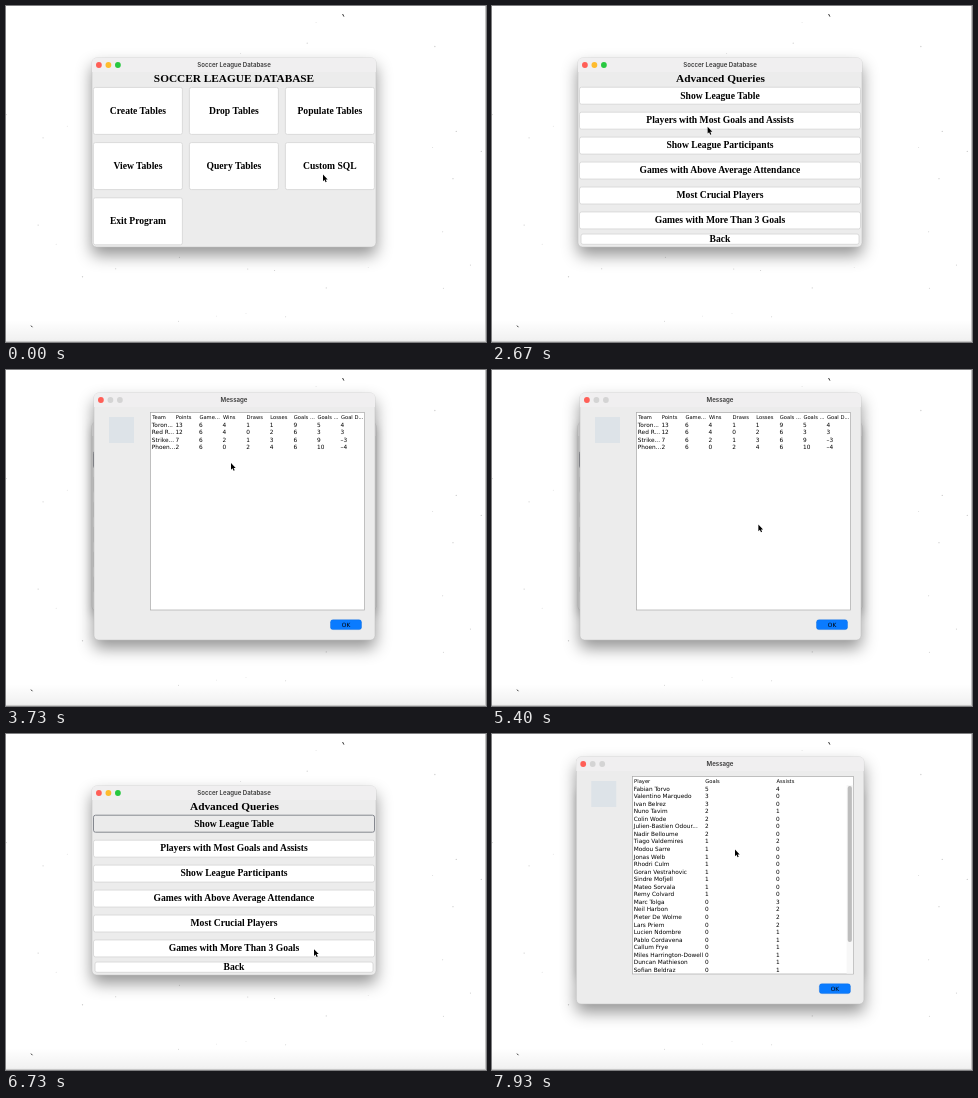
An HTML page for the animation above (8000 ms loop, 480x336 px).

```html
<!DOCTYPE html>
<html lang="en">
<head>
<meta charset="utf-8">
<title>League database demo</title>
<style>
  html, body { margin: 0; width: 100%; height: 100%; overflow: hidden; background: #fff; }
  svg { display: block; width: 480px; height: 336px; }
  text { white-space: pre; font-kerning: none; }
  .title { font: 600 6.1px Inter, "Open Sans", sans-serif; fill: #3a3a3a; }
  .head { font: bold 11.3px "Liberation Serif", Times, serif; }
  .label { font: bold 9.6px "Liberation Serif", Times, serif; }
  .cell { font: 5.8px "DejaVu Sans", sans-serif; }
  .th { font: 5.2px "DejaVu Sans", sans-serif; }
  .mid { text-anchor: middle; }
  .frame { fill: #ececec; stroke: #bdbdbd; stroke-width: .5; filter: drop-shadow(0 8px 8px rgba(0, 0, 0, .42)); }
  .behind .frame { filter: drop-shadow(0 4px 5px rgba(0, 0, 0, .25)); }
  .btn rect { fill: #fff; stroke: #d3d3d3; stroke-width: .8; }
  .btn.down rect { fill: #ebebeb; stroke: #85888f; stroke-width: 1; }
  .ok rect { fill: #0a7bff; stroke: #0869dc; stroke-width: .4; }
  .ok.down rect { fill: #fff; stroke: #555; stroke-width: .8; }
</style>
</head>
<body>
<svg id="stage" viewBox="0 0 480 336"></svg>
<script>
const LOOP = 8000, TICK = 1000 / 15;
const stage = document.getElementById('stage');

function add(parent, tag, attrs = {}, content) {
  const el = document.createElementNS('http://www.w3.org/2000/svg', tag);
  for (const key in attrs) el.setAttribute(key, attrs[key]);
  if (content !== undefined) el.textContent = content;
  parent.append(el);
  return el;
}
const group = (parent, cls = '') => add(parent, 'g', { class: cls });
const rect = (parent, x, y, width, height, rest) => add(parent, 'rect', { x, y, width, height, ...rest });
const text = (parent, x, y, cls, str) => add(parent, 'text', { x, y, class: cls }, str);
const show = (el, on) => el.setAttribute('visibility', on ? 'visible' : 'hidden');

function seeded(seed) {
  return () => (seed = seed * 16807 % 2147483647) / 2147483647;
}

function backdrop() {
  rect(stage, 0, 0, 480, 336, { fill: '#fff' });
  const shade = add(stage, 'linearGradient', { id: 'shade', x2: 0, y2: 1 });
  add(shade, 'stop', { offset: 0, 'stop-opacity': 0 });
  add(shade, 'stop', { offset: 1, 'stop-opacity': .06 });
  rect(stage, 0, 314, 480, 22, { fill: 'url(#shade)' });
  const rand = seeded(71);
  for (let i = 0; i < 40; i++) {
    add(stage, 'circle', { cx: rand() * 476, cy: rand() * 320, r: .4 + rand() * .3, fill: '#ccc' });
  }
  add(stage, 'path', { d: 'M336.6 8l1.3 2.6M25 319.6l1.4 1.6', stroke: '#333', 'stroke-width': 1 });
  add(stage, 'path', { d: 'M479.5 0V336M0 335.4H480', stroke: '#c4c4c4', 'stroke-width': 1 });
}

function makeWindow(x, y, w, h, title, colors) {
  const win = group(stage);
  rect(win, x, y, w, h, { rx: 4.5, class: 'frame' });
  add(win, 'path', { d: `M${x} ${y + 14}v-9.5q0-4.5 4.5-4.5h${w - 9}q4.5 0 4.5 4.5v9.5z`, fill: '#f0eff0' });
  colors.forEach((fill, i) =>
    add(win, 'circle', { cx: x + 6.9 + i * 9.5, cy: y + 7, r: 2.9, fill }));
  text(win, 228, y + 9.2, 'title mid', title);
  return win;
}

function button(parent, x, y, w, h, label) {
  const b = group(parent, 'btn');
  rect(b, x, y, w, h, { rx: 2 });
  text(b, x + w / 2, y + h / 2 + 2.8, 'label mid', label);
  return b;
}

function dialog(x, w, tableX, step, header, rows) {
  const win = makeWindow(x, 23, w, 247, 'Message', ['#ff5f57', '#d4d4d4', '#d4d4d4']);
  const colX = i => tableX + 1.7 + i * step;
  rect(win, x + 15, 47, 25, 26, { fill: '#dde3e8' });
  rect(win, tableX, 42.5, x + w - 10.4 - tableX, 197.5, { fill: '#fff', stroke: '#a9a9a9', 'stroke-width': .7 });
  header.forEach((str, i) => text(win, colX(i), 48.7, 'th', str));
  rows.forEach((row, r) =>
    row.forEach((str, i) => text(win, colX(i) - .4, 56.6 + r * 7.55, 'cell', str)));
  const ok = group(win, 'ok');
  rect(ok, x + w - 44.5, 249.8, 31, 9.8, { rx: 2.4 });
  text(ok, x + w - 29, 256.8, 'cell mid', 'OK');
  return { win, ok };
}

backdrop();

const main = makeWindow(86, 52, 284, 189, 'Soccer League Database', ['#ff5f57', '#febc2e', '#28c840']);
const home = group(main);
text(home, 228, 76, 'head mid', 'SOCCER LEAGUE DATABASE');
const homeButtons = ['Create Tables', 'Drop Tables', 'Populate Tables', 'View Tables',
  'Query Tables', 'Custom SQL', 'Exit Program'].map((label, i) =>
  button(home, 87.4 + i % 3 * 96, 81.4 + Math.floor(i / 3) * 55.2, 89, 47, label));

const queries = group(main);
text(queries, 228.4, 76, 'head mid', 'Advanced Queries');
const queryButtons = ['Show League Table', 'Players with Most Goals and Assists', 'Show League Participants',
  'Games with Above Average Attendance', 'Most Crucial Players', 'Games with More Than 3 Goals'].map((label, i) =>
  button(queries, 87.5, 81.2 + i * 24.95, 281, 17, label));
button(queries, 89, 228, 278, 10.3, 'Back');

const standings = dialog(88, 281, 144.5, 23.6,
  ['Team', 'Points', 'Game...', 'Wins', 'Draws', 'Losses', 'Goals ...', 'Goals ...', 'Goal D...'],
  ['Toron...|13|6|4|1|1|9|5|4', 'Red R...|12|6|4|0|2|6|3|3',
    'Strike...|7|6|2|1|3|6|9|–3', 'Phoen...|2|6|0|2|4|6|10|–4'].map(s => s.split('|')));

// Names grouped by goals; a trailing number is the assists
const byGoals = {
  5: 'Fabian Torvo 4',
  3: 'Valentino Marquedo, Ivan Belrez',
  2: 'Nuno Tavim 1, Colin Wode, Julien-Bastien Odour..., Nadir Belloume',
  1: 'Tiago Valdemires 2, Modou Sarre, Jonas Welb, Rhodri Culm, Goran Vestrahovic, ' +
    'Sindre Mofjell, Mateo Sorvala, Remy Colvard',
  0: 'Marc Tolga 3, Neil Harbon 2, Pieter De Wolme 2, Lars Priem 2, Lucien Ndombre 1, ' +
    'Pablo Cordavena 1, Callum Frye 1, Miles Harrington-Dowell 1, Duncan Mathieson 1, Sofian Beldraz 1'
};
const players = Object.keys(byGoals).reverse().flatMap(goals =>
  byGoals[goals].split(', ').map(entry => {
    const [, name, assists = '0'] = entry.match(/^(.+?)(?: (\d))?$/);
    return [name, goals, assists];
  }));
const scorers = dialog(84.3, 287.6, 140.4, 71.2, ['Player', 'Goals', 'Assists'], players);
rect(scorers.win, 354.6, 51, 6.5, 188.6, { fill: '#f7f7f7' });
rect(scorers.win, 355.7, 52, 4.2, 156, { rx: 2.1, fill: '#bdbdbd' });

const cursor = add(stage, 'path', {
  d: 'M0 0V6.7L1.5 5.3 2.6 7.8 3.7 7.3 2.6 4.9H4.7Z',
  fill: '#000', stroke: '#fff', 'stroke-width': .5, 'paint-order': 'stroke'
});

// Pointer moves: Bézier points, eased out with the given power
const onSql = [317, 168.5], onQuery = [229, 166], onLeague = [225, 93], onOk = [332, 252], onPlayers = [243, 115.5];
const moves = [
  { start: 267, end: 1200, power: 1.8, points: [onSql, [285, 206], onQuery] },
  { start: 2133, end: 3233, power: 2.4, points: [onQuery, [118, 365], [228, 94], onLeague] },
  { start: 5067, end: 6467, power: 1.8, points: [onLeague, onOk] },
  { start: 6600, end: 7433, power: 1.8, points: [onOk, onPlayers] }
];

function bezier(points, u) {
  if (points.length === 1) return points[0];
  const next = points.slice(1).map(([x, y], i) =>
    [points[i][0] + (x - points[i][0]) * u, points[i][1] + (y - points[i][1]) * u]);
  return bezier(next, u);
}

function pointerAt(t) {
  const move = moves.filter(m => t >= m.start).pop() || moves[0];
  const s = Math.min(1, Math.max(0, (t - move.start) / (move.end - move.start)));
  return bezier(move.points, 1 - (1 - s) ** move.power);
}

function draw(now) {
  const t = Math.floor((now % LOOP + 4) / TICK) * TICK % LOOP;
  const within = (from, to) => t >= from - 4 && t < to - 4;
  const press = (el, on) => el.classList.toggle('down', on);
  const first = within(3733, 6600), second = within(7933, LOOP + 4);

  show(home, within(0, 1800));
  show(queries, !within(0, 1800));
  show(standings.win, first);
  show(scorers.win, second);
  main.classList.toggle('behind', first || second);
  press(homeButtons[4], within(1733, 1800));
  press(queryButtons[0], within(3533, 6867));
  press(queryButtons[1], within(7467, LOOP + 4));
  press(standings.ok, within(6533, 6600));
  cursor.setAttribute('transform', `translate(${pointerAt(t)})`);
}

function loop() {
  draw(performance.now());
  requestAnimationFrame(loop);
}
loop();
</script>
</body>
</html>
```
